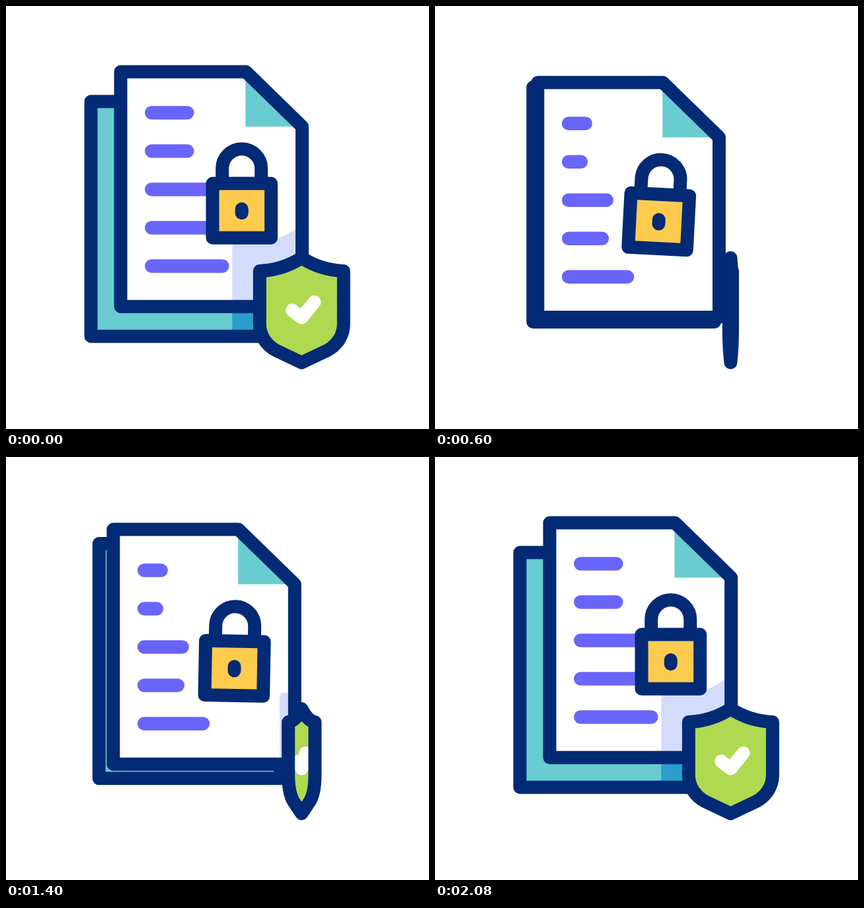
These frames come from a looping animation (640 by 640 pixels, 2240 ms). An HTML page:

```html
<!DOCTYPE html>
<html lang="en">
<head>
<meta charset="utf-8">
<title>Protected documents</title>
<style>
  html, body { margin: 0; width: 100%; height: 100%; overflow: hidden; background: #fff; }
  svg { display: block; width: 100%; height: 100%; }
  .line { fill: none; stroke: #032a75; stroke-width: 20; stroke-linecap: round; stroke-linejoin: round; }
  #rows { stroke: #6965fb; stroke-width: 20.5; stroke-linecap: round; }
</style>
</head>
<body>
<svg viewBox="0 0 640 640">
  <defs>
    <path id="page" d="M173.5 99.5H363L448 182.3V454.7H173.5Z"/>
    <path id="shade" d="M0 332C-15 341-38 357-60 357H-95Q-105 357-105 367V600H105V367Q105 357 95 357H60C38 357 15 341 0 332Z"/>
    <clipPath id="inPage"><use href="#page"/></clipPath>
  </defs>

  <g id="back">
    <use href="#page" fill="#68ccd0"/>
    <g clip-path="url(#inPage)"><use href="#shade" id="backShade" fill="#2a9fcb"/></g>
    <use href="#page" class="line"/>
  </g>

  <g id="front">
    <use href="#page" fill="#fff"/>
    <g clip-path="url(#inPage)"><use href="#shade" id="frontShade" fill="#d3dcfd"/></g>
    <path d="M362.4 99.5V182.4H448Z" fill="#68ccd0"/>
    <use href="#page" class="line"/>
    <g id="rows"></g>
    <g id="lock">
      <path class="line" d="M327.2 268.5V245.7A29.5 29.5 0 0 1 386.2 245.7V268.5"/>
      <rect class="line" x="312.5" y="268.6" width="88.6" height="82.2" style="fill:#ffcb4f"/>
      <path class="line" d="M356.7 307V313.2"/>
    </g>
  </g>

  <path id="shieldFill" fill="#b0d952"/>
  <path id="check" class="line" style="stroke:#fff"/>
  <path id="shieldEdge" class="line"/>
</svg>

<script>
const LOOP = 2240, STEP = 40, LAST = 2080;
const SHIELD_X = 447.3;
const byId = id => document.getElementById(id);
const clamp = v => Math.min(1, Math.max(0, v));
const smooth = v => { v = clamp(v); return v * v * (3 - 2 * v); };

// Ease with a slow start and a long tail: cubic-bezier(.45, 0, .25, 1)
function ease(x) {
  x = clamp(x);
  let lo = 0, hi = 1;
  for (let i = 0; i < 24; i++) {
    const u = (lo + hi) / 2, v = 1 - u;
    if (3 * v * v * u * .45 + 3 * v * u * u * .25 + u * u * u < x) lo = u; else hi = u;
  }
  return lo * lo * (3 - 2 * lo);
}

// Values reached one after another at equal intervals
function keyed(values, t, start, span) {
  const pos = Math.min(values.length - 1, Math.max(0, (t - start) / span));
  const i = Math.min(values.length - 2, Math.floor(pos));
  return values[i] + (values[i + 1] - values[i]) * smooth(pos - i);
}

// Text rows from top to bottom: length and delay
const rows = [[54, 80], [54, 160], [86, 320], [86, 240], [107, 0]].map(([length, delay], i) => {
  const el = document.createElementNS("http://www.w3.org/2000/svg", "path");
  byId("rows").append(el);
  return { el, length, delay, y: 161.5 + 58 * i };
});

function shieldPath(s) {
  const p = (x, y) => `${SHIELD_X + x * s} ${y} `;
  const side = k =>
    `M${p(0, 381)}C${p(17 * k, 392)}${p(40 * k, 400)}${p(63.5 * k, 401)}` +
    `L${p(63.5 * k, 481)}C${p(63.5 * k, 498)}${p(54 * k, 513)}${p(39 * k, 521)}L${p(0, 539.5)}`;
  return side(-1) + side(1);
}

function movePage(name, dx, dy, s) {
  byId(name).setAttribute("transform", `translate(${dx} ${dy})`);
  byId(name + "Shade").setAttribute("transform", `translate(${SHIELD_X - dx} ${-dy}) scale(${s} 1)`);
}

function draw(t) {
  const closed = ease(t / 1015) - ease((t - 1015) / 1015);
  const turn = keyed([1, 0, 1, 0, 1], t, 198, 458);

  movePage("front", -21.5 * closed, 19.3 * closed, turn);
  movePage("back", -45 + 23.5 * closed, 45 - 25.7 * closed, turn);

  for (const { el, length, delay, y } of rows) {
    const cut = keyed([0, 36.3, 0, 36.3, 0], t, delay, 400);
    el.setAttribute("d", `M220.3 ${y}h${length - cut}`);
  }

  const tilt = keyed([0, -4.8, 3, -4.8, 3, 0], t, 0, 305);
  byId("lock").setAttribute("transform", `rotate(${tilt} 356.7 310)`);

  const outline = shieldPath(turn);
  byId("shieldFill").setAttribute("d", outline);
  byId("shieldEdge").setAttribute("d", outline);
  byId("check").setAttribute("d",
    `M${SHIELD_X - 14.3 * turn} 460.3L${SHIELD_X} 471.5L${SHIELD_X + 19.3 * turn} 448`);
}

const begin = performance.now();
function tick() {
  const t = (performance.now() - begin) % LOOP;
  draw(Math.min(LAST, Math.floor(t / STEP) * STEP));
  requestAnimationFrame(tick);
}
tick();
</script>
</body>
</html>
```
